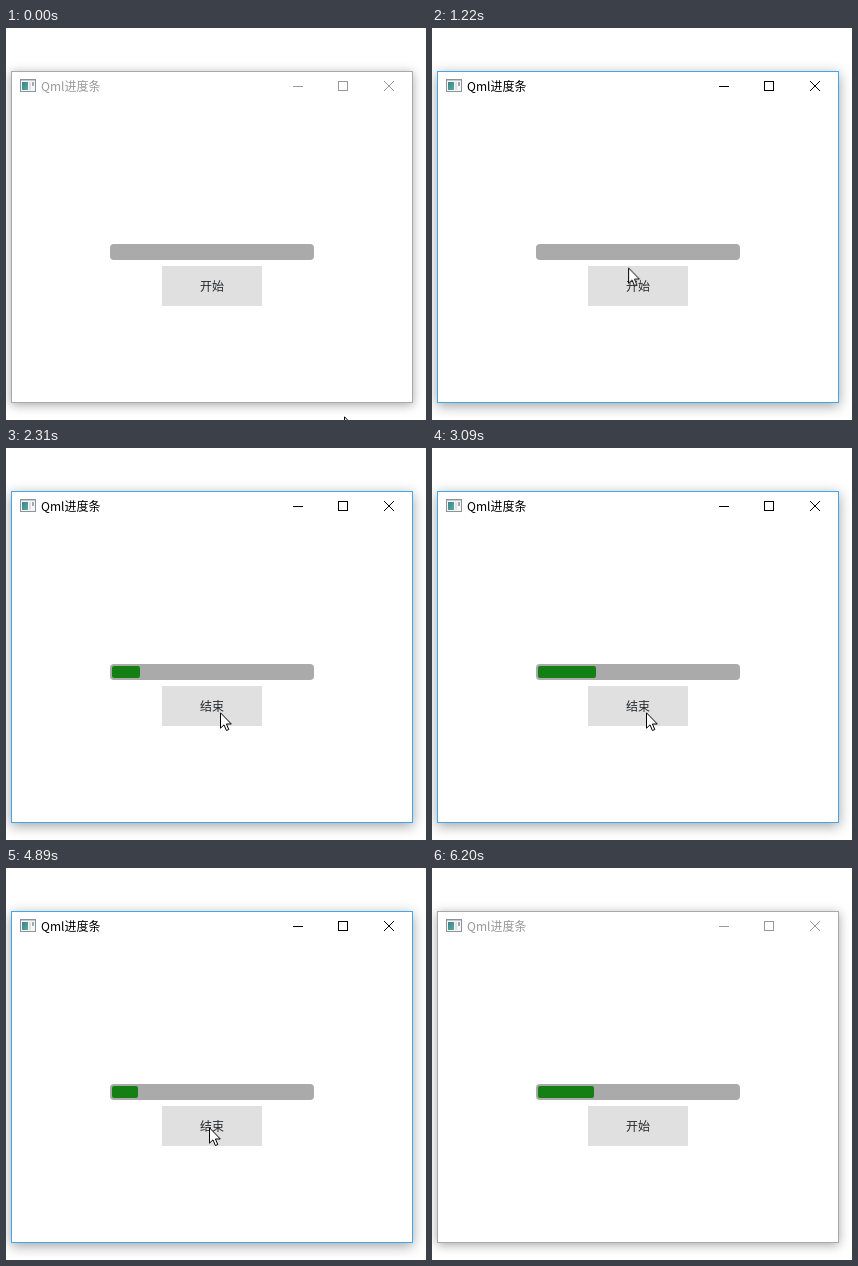
Recreate the animation shown at these times as an HTML page. Size 420 by 392 pixels, loop 6.25 s.

```html
<!DOCTYPE html>
<html lang="zh-CN">
<head>
<meta charset="utf-8">
<title>Qml进度条</title>
<style>
  :root { --loop: 6250ms; }
  html, body { margin: 0; width: 100%; height: 100%; overflow: hidden; background: #fff; }
  body { font: 12px/16px "Noto Sans CJK SC", "Noto Sans CJK", sans-serif; }
  .stage { position: relative; width: 420px; height: 392px; overflow: hidden; }
  .stage * { position: absolute; box-sizing: border-box; }

  .window {
    left: 5px; top: 43px; width: 402px; height: 332px;
    border: 1px solid; background: #fff;
    animation: focus var(--loop) step-end infinite;
  }
  .chrome { left: 0; top: 0; }
  .title { left: 35px; top: 50px; white-space: nowrap; animation: ink var(--loop) step-end infinite; }
  .buttons { animation: ink var(--loop) step-end infinite; }

  .track { left: 104px; top: 216px; width: 204px; height: 16px; border-radius: 4px; background: #aaa; }
  .fill { left: 2px; top: 2px; height: 12px; border-radius: 2px; background: #148014; animation: fill var(--loop) infinite; }

  .button { left: 156px; top: 238px; width: 100px; height: 40px; background: #e0e0e0; color: #26282a; }
  .button span { left: 0; top: 0; width: 100%; line-height: 40px; text-align: center; }
  .start { animation: start var(--loop) step-end infinite; }
  .stop { animation: stop var(--loop) step-end infinite; }

  .cursor { left: 0; top: 0; animation: move var(--loop) linear infinite; }

  @keyframes focus {
    0%, 99.2% { border-color: #a9a9a9; box-shadow: 0 2px 10px rgba(0, 0, 0, .35); }
    12.32% { border-color: #41a6ec; box-shadow: 0 3px 12px rgba(0, 0, 0, .37); }
  }
  @keyframes ink {
    0%, 99.2% { color: #999; }
    12.32% { color: #000; }
  }
  /* The bar grows 2px every 51ms while running. */
  @keyframes fill {
    0% { width: 0; animation-timing-function: step-end; }
    25.072% { width: 0; animation-timing-function: steps(39, end); }
    56.896% { width: 78px; animation-timing-function: step-end; }
    67.6% { width: 0; animation-timing-function: steps(28, end); }
    90.448%, 100% { width: 56px; }
  }
  @keyframes start {
    0%, 57.28%, 90.88% { opacity: 1; }
    25.072%, 67.6% { opacity: 0; }
  }
  @keyframes stop {
    0%, 57.28%, 90.88% { opacity: 0; }
    25.072%, 67.6% { opacity: 1; }
  }
  @keyframes move {
    0%, .4% { transform: translate(338px, 388px); animation-timing-function: ease-out; }
    10.24% { transform: translate(162px, 152px); }
    13.2%, 16.5% { transform: translate(157px, 117px); }
    19.52% { transform: translate(196px, 239px); animation-timing-function: ease-out; }
    24%, 56.9% { transform: translate(214px, 264px); }
    57.76% { transform: translate(210px, 263px); }
    60% { transform: translate(205px, 260px); }
    62.24%, 91.04% { transform: translate(203px, 259px); animation-timing-function: ease-in-out; }
    94.8%, 100% { transform: translate(364px, 394px); }
  }
</style>
</head>
<body>
<div class="stage">
  <div class="window"></div>
  <svg class="chrome" width="420" height="80" shape-rendering="crispEdges">
    <defs>
      <linearGradient id="pane" x2="1" y2="1">
        <stop stop-color="#3b7f9c"/>
        <stop offset="1" stop-color="#58ae8c"/>
      </linearGradient>
    </defs>
    <path d="M14.5 51.5h15v12h-15z" fill="#f6f6f6" stroke="#8e9299"/>
    <path d="M15 52h14v1h-14z" fill="#c5cbd2"/>
    <path d="M16 54h6v8h-6z" fill="url(#pane)"/>
    <path d="M23 54h2v8h-2z" fill="#dfe3e6"/>
    <path d="M26 54h2v4h-2z" fill="#9eabb8"/>
    <g class="buttons" fill="none" stroke="currentColor">
      <path d="M287 58.5h10M332.5 53.5h9v9h-9z"/>
      <path d="M378 53l10 10M388 53l-10 10" shape-rendering="auto"/>
    </g>
  </svg>
  <div class="title">Qml进度条</div>
  <div class="track"><div class="fill"></div></div>
  <div class="button">
    <span class="start">开始</span>
    <span class="stop">结束</span>
  </div>
  <svg class="cursor" width="13" height="20">
    <path d="M.5 .8v15.4l3.5-3.4 2.4 5.7 2.4-1-2.4-5.5h4.9z" fill="#fff" stroke="#000"/>
  </svg>
</div>
</body>
</html>
```
